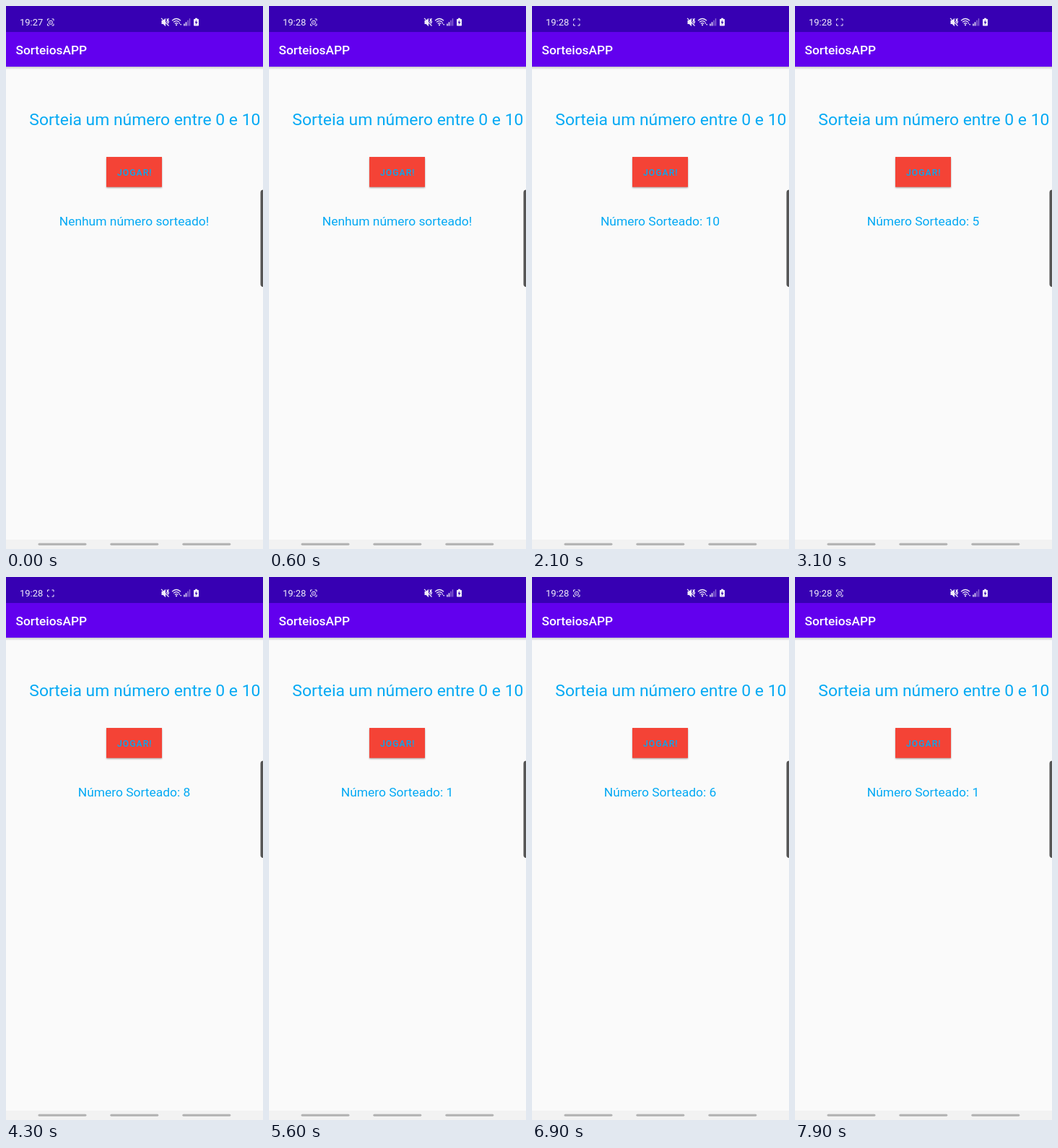
Recreate the animation shown at these times as an HTML page. Size 356 by 752 pixels, loop 8 s.

```html
<!DOCTYPE html>
<html lang="pt">
<head>
<meta charset="utf-8">
<title>Sorteio</title>
<style>
html, body { margin: 0; width: 100%; height: 100%; overflow: hidden; background: #fafafa; }
svg { display: block; width: 356px; height: 752px; }
text { font-family: Roboto, sans-serif; }
.blue { fill: #03a9f4; }
.medium { font-weight: 500; }
.line { fill: none; stroke: #fff; }
</style>
</head>
<body>
<svg viewBox="0 0 356 752">
  <defs>
    <linearGradient id="shade" x2="0" y2="1">
      <stop offset="0" stop-opacity=".2"/>
      <stop offset="1" stop-opacity="0"/>
    </linearGradient>
    <filter id="blur" x="-10%" y="-10%" width="120%" height="120%">
      <feGaussianBlur stdDeviation="1.1"/>
    </filter>
  </defs>

  <rect width="356" height="752" fill="#fafafa"/>
  <rect y="84" width="356" height="4" fill="url(#shade)"/>
  <rect y="36" width="356" height="48" fill="#6200ee"/>
  <rect width="356" height="36" fill="#3700b3"/>

  <!-- status bar -->
  <g fill="#fff" opacity=".93">
    <text id="clock" x="19" y="27.2" font-size="13">19:27</text>
    <path class="line" d="M57.5 20.5v-2.5h2.5M63.5 18h2.5v2.5M66 24.5v2.5h-2.5M60 27h-2.5v-2.5"/>
    <g id="camera">
      <rect class="line" x="59.5" y="20.5" width="4.8" height="4.6" rx="1.2"/>
      <circle cx="61.9" cy="22.8" r=".8"/>
    </g>
    <path d="M215.5 20h2.2l3.3-3.2v11.4l-3.3-3.2h-2.2z"/>
    <path class="line" stroke-width="1.2" d="M215 16.8l10.5 10.7M222.6 17.5l1.3 2-1.2 1.8 1.3 1.8M225.3 17l-1 2.4 1.2 2.4-1.2 2.6"/>
    <g class="line" stroke-width="1.2">
      <path d="M230 20.2q6-5.4 12 0M231.9 22.4q4.1-3.6 8.2 0M233.8 24.5q2.2-1.8 4.4 0"/>
    </g>
    <circle cx="236" cy="26.3" r="1.1"/>
    <path d="M239.2 24.4l1.1-1.8 1.1 1.8zM241 25l1.1 1.9 1.1-1.9z"/>
    <path d="M246.2 24.5h1.5v3h-1.5zM248.7 22.3h1.5v5.2h-1.5z"/>
    <path opacity=".45" d="M251.2 19.8h1.5v7.7h-1.5zM253.7 17.3h1.5v10.2h-1.5z"/>
    <path d="M262 16.7h3v1.3h1.2q.8 0 .8.8v8q0 .8-.8.8h-5.4q-.8 0-.8-.8v-8q0-.8.8-.8h1.2z"/>
    <path fill="#3700b3" d="M264.1 19.2l-2.5 4h1.6l-.5 3 2.7-4.2h-1.7z"/>
  </g>

  <text class="medium" x="13.5" y="66.7" font-size="17.3" fill="#fff">SorteiosAPP</text>
  <text class="blue" x="32.3" y="164.8" font-size="22.9">Sorteia um número entre 0 e 10</text>

  <rect x="139" y="210.4" width="77" height="41.6" opacity=".3" filter="url(#blur)"/>
  <rect x="139" y="209" width="77" height="41.7" fill="#f44336"/>
  <text class="blue medium" x="154" y="235" font-size="12.1" letter-spacing="1.08">JOGAR!</text>

  <text id="result" class="blue" x="177.5" y="303.6" font-size="17.4" text-anchor="middle">Nenhum número sorteado!</text>

  <rect x="352.5" y="254.5" width="10" height="134.5" rx="4" fill="#555"/>

  <rect y="739" width="356" height="13" fill="#f2f2f2"/>
  <g fill="#b5b5b5">
    <rect x="44.5" y="743.7" width="67" height="3.2" rx="1.6"/>
    <rect x="144.3" y="743.7" width="67" height="3.2" rx="1.6"/>
    <rect x="244.3" y="743.7" width="67" height="3.2" rx="1.6"/>
  </g>
</svg>
<script>
const LOOP = 8000;
const draws = [[700, 7], [1200, 2], [1800, 10], [2300, 5], [4300, 8], [4800, 1],
  [6200, 10], [6800, 6], [7400, 3], [7900, 1]];
const [clock, camera, result] = ['clock', 'camera', 'result'].map(id => document.getElementById(id));
const start = performance.now();

function setText(node, value) {
  if (node.textContent !== value) node.textContent = value;
}

// The recording icon toggles every half second, with one late beat.
function cameraOn(t) {
  const first = t < 6000 ? 100 : 200;
  return Math.floor((t - first) / 500) % 2 !== 0;
}

function render(now) {
  const t = Math.max(0, now - start) % LOOP;
  const last = draws.filter(([at]) => at <= t).pop();
  setText(clock, t < 100 ? '19:27' : '19:28');
  setText(result, last ? 'Número Sorteado: ' + last[1] : 'Nenhum número sorteado!');
  camera.style.visibility = cameraOn(t) ? 'visible' : 'hidden';
  requestAnimationFrame(render);
}
render(start);
</script>
</body>
</html>
```
